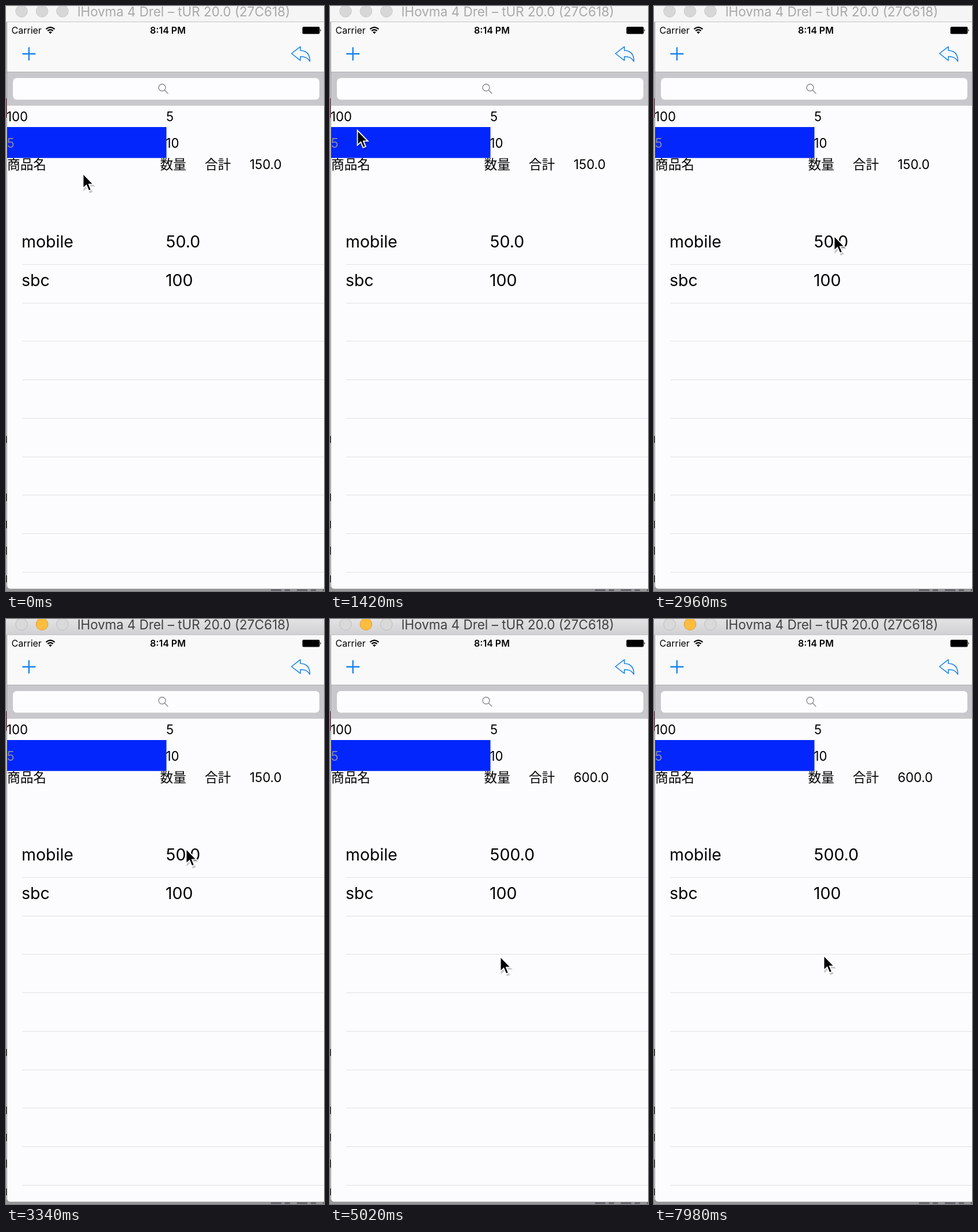
An HTML page that plays this animation: 552x1015 px, repeating every 8 s.

```html
<!DOCTYPE html>
<html lang="en">
<head>
<meta charset="utf-8">
<style>
  html, body { margin: 0; width: 100%; height: 100%; overflow: hidden; }
  svg { display: block; width: 552px; height: 1015px; }
  text { font-family: Inter, "Noto Sans CJK JP", "Noto Sans CJK", sans-serif; white-space: pre; }
  .status { font-size: 16px; }
  .label { font-size: 22.2px; }
  .cjk { font-family: "Noto Sans CJK JP", "Noto Sans CJK", sans-serif; font-size: 22.67px; }
  .row { font-size: 28.5px; }
  .bar { fill: #f5f5f6; }
  .light { fill: #d7d7d7; stroke: #cbcbcb; }
  #title { font-size: 22.5px; fill: #a9a9a9; }
  .active .bar { fill: url(#chrome); }
  .active #title { fill: #414141; }
  .active .light { fill: #d9d9d9; stroke: #bdbdbf; }
  .active .mid { fill: #fdbd3e; stroke: #e2a02f; }
</style>
</head>
<body>
<svg id="stage" viewBox="0 0 552 1015">
  <defs>
    <linearGradient id="chrome" x2="0" y2="1">
      <stop stop-color="#e3e2e4"/><stop offset="1" stop-color="#d0cfd2"/>
    </linearGradient>
  </defs>

  <!-- desktop behind the window -->
  <rect width="552" height="1015" fill="#98989b"/>
  <rect width="1" height="1008" fill="#d2d2d5"/>
  <path d="M460 1013.5H552" stroke="#66666e" stroke-width="3" stroke-dasharray="18 6 9 12"/>
  <path d="M.5 160V194" stroke="#5a2430"/>
  <path d="M.7 746v12M.7 846v13M.7 893v13M.7 938v14M.7 988v12" stroke="#222" stroke-width="1.4"/>

  <!-- window -->
  <path d="M2 0H552V1011H8Q2 1011 2 1005Z" fill="#fcfcfe"/>
  <rect class="bar" x="0" width="552" height="28"/>
  <path d="M0 27.5H552" stroke="#c4c4c7"/>
  <circle class="light" cx="27" cy="9" r="10.3"/>
  <circle class="light mid" cx="62.5" cy="9" r="10.3"/>
  <circle class="light" cx="98" cy="9" r="10.3"/>
  <text id="title" x="124" y="18">lHovma 4 Drel – tUR 20.0 (27C618)</text>

  <!-- status and navigation bars -->
  <rect x="2" y="28" width="550" height="86" fill="#f9f9fa"/>
  <text class="status" x="9.5" y="48">Carrier</text>
  <g fill="none" stroke="#000" stroke-width="2.2">
    <path d="M69.5 40.2Q77 33.7 84.5 40.2M72.3 43.2Q77 39.2 81.7 43.2"/>
  </g>
  <path d="M74.2 45.3Q77 43 79.8 45.3L77 48.2Z"/>
  <text class="status" x="281" y="48" text-anchor="middle" font-weight="600">8:14 PM</text>
  <rect x="514.5" y="36" width="30" height="12.5" rx="2"/>
  <path d="M545.5 40Q548 42.2 545.5 44.5Z"/>
  <g fill="none" stroke="#1481ee">
    <path d="M28.3 83H51.3M39.8 71.5V94.5" stroke-width="2.3"/>
    <path d="M495.5 82.5L511 70.5V77.3C521 77.5 527.5 83 527.5 96C523.5 89.5 519 87.7 511 87.7V94.5Z"
      stroke-width="1.5" stroke-linejoin="round"/>
  </g>

  <!-- search -->
  <rect x="2" y="114" width="550" height="59" fill="#c8c8cc"/>
  <path d="M2 114.5H552" stroke="#b0b0b3"/>
  <rect x="12" y="125" width="532" height="37.5" rx="6.5" fill="#fdfdff"/>
  <g fill="none" stroke="#8a8a8d" stroke-width="1.4">
    <circle cx="271" cy="141.5" r="6"/><path d="M275.4 146L281.3 152"/>
  </g>

  <!-- form -->
  <rect x="2" y="210" width="276.5" height="53.7" fill="#0226fb"/>
  <g class="label">
    <text x="1" y="200">100</text>
    <text x="278" y="200">5</text>
    <text x="1.5" y="246" fill="#8587a8">5</text>
    <text x="277.5" y="246">10</text>
    <text id="total" x="423" y="283"></text>
  </g>
  <g class="cjk">
    <text x="2" y="283">商品名</text>
    <text x="267.5" y="283">数量</text>
    <text x="345" y="283">合計</text>
  </g>

  <!-- list -->
  <g id="lines" stroke="#e1e1e7"></g>
  <g class="row">
    <text x="27" y="419">mobile</text>
    <text id="price" x="277.5" y="419"></text>
    <text x="27" y="486">sbc</text>
    <text x="277" y="486">100</text>
  </g>

  <g id="cursor">
    <path d="M2 4.5V26L7.5 21L11.8 31L14.6 29.8L10.3 19.8H17.5Z" fill="#000" opacity=".2" transform="translate(1 2)"
      stroke="#000" stroke-width="3"/>
    <path d="M1.5 3V24.5L6.8 19.6L11 29.6L13.8 28.4L9.6 18.4H16.6Z" fill="#000" stroke="#fff"
      stroke-width="3.6" paint-order="stroke"/>
  </g>
</svg>
<script>
const LOOP = 8000, ACTIVATE = 3100, UPDATE = 3450;
const $ = id => document.getElementById(id);

// cursor stops: time, x, y
const path = [
  [0, 133, 290], [100, 133, 290], [780, 47, 215], [1660, 47, 215],
  [2380, 312, 398], [3400, 312, 398], [3700, 311, 398], [4200, 311, 398],
  [4850, 295, 585], [5900, 295, 585], [6000, 294, 583], [LOOP, 294, 583]
];

for (let i = 0; i < 9; i++) {
  const y = Math.round(448 + i * 66.7) + 0.5;
  $('lines').innerHTML += `<path d="M28 ${y}H552"/>`;
}

const ease = u => u * u * (3 - 2 * u);

function cursorAt(t) {
  const i = path.findIndex(stop => stop[0] > t);
  const [t0, x0, y0] = path[i - 1], [t1, x1, y1] = path[i];
  const u = ease((t - t0) / (t1 - t0));
  return [x0 + (x1 - x0) * u, y0 + (y1 - y0) * u];
}

function draw(now) {
  const t = now % LOOP;
  $('stage').classList.toggle('active', t >= ACTIVATE);
  $('price').textContent = t < UPDATE ? '50.0' : '500.0';
  $('total').textContent = t < UPDATE ? '150.0' : '600.0';
  $('cursor').setAttribute('transform', `translate(${cursorAt(t)})`);
  requestAnimationFrame(draw);
}
draw(performance.now());
</script>
</body>
</html>
```
